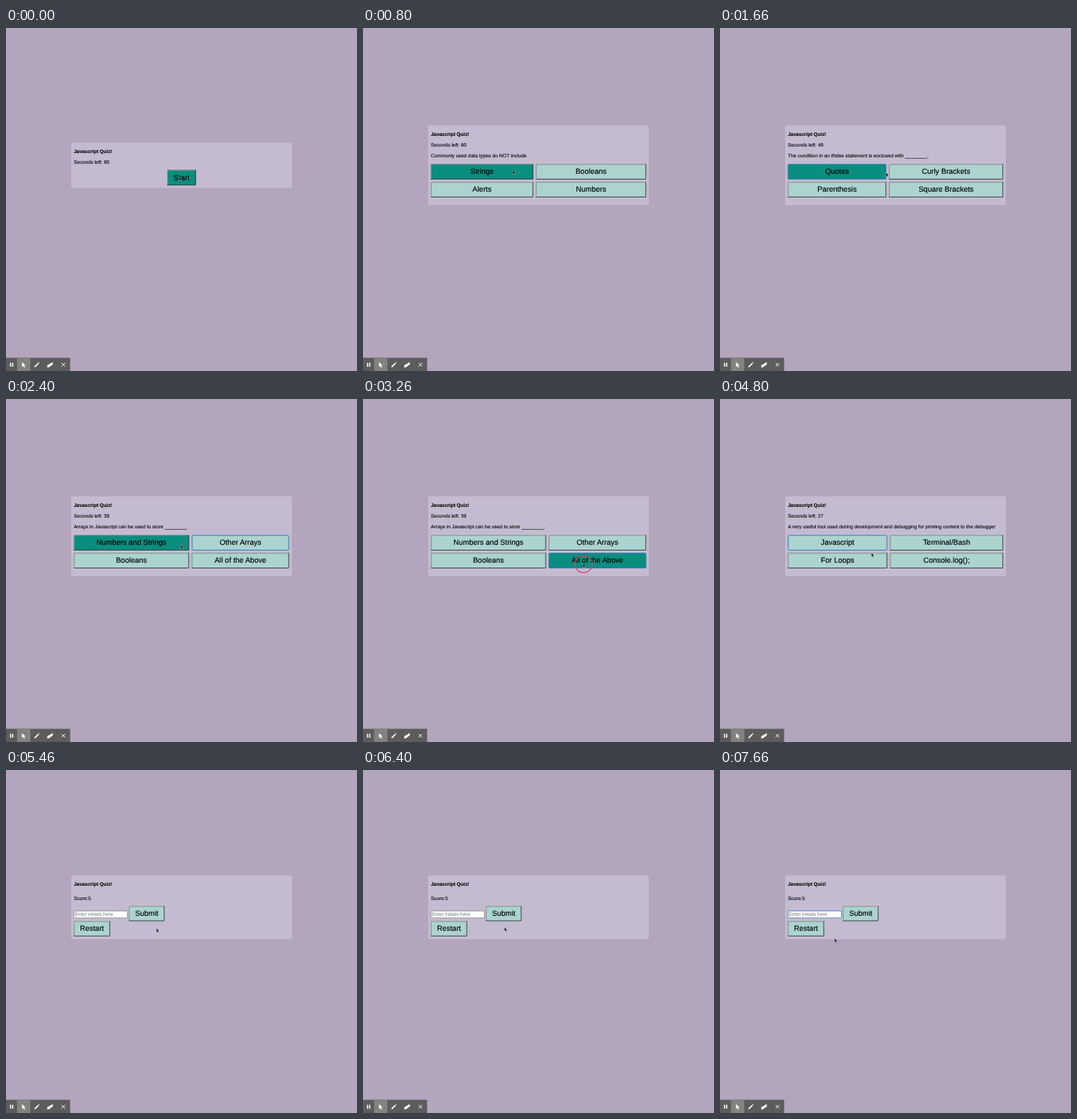
An HTML page that plays this animation: 490 px wide and 480 px high, repeating every 8 s.

```html
<!DOCTYPE html>
<html lang="en">
<head>
<meta charset="utf-8">
<title>Quiz</title>
<style>
  html, body { margin: 0; width: 100%; height: 100%; overflow: hidden; background: #b2a5bc; }
  svg { display: block; width: 490px; height: 480px; }
  text { font-family: "Liberation Sans", Arial, sans-serif; font-size: 6.93px; text-rendering: geometricPrecision; stroke: #000; stroke-width: .1px; }
  .title { font-weight: bold; }
  .label { font-size: 10.4px; text-anchor: middle; stroke-width: .15px; }
  .hint { fill: #757575; stroke: none; }
</style>
</head>
<body>
<svg viewBox="0 0 490 480" xmlns="http://www.w3.org/2000/svg">
  <rect width="490" height="480" fill="#b2a5bc"/>
  <g id="page"></g>
  <g id="toolbar">
    <rect y="461.5" width="89.5" height="18.5" fill="#5d5c5d"/>
    <rect x="15.5" y="461.5" width="18.5" height="18.5" fill="#83827f"/>
    <g fill="none" stroke="#fff">
      <path d="M6.4 468.5V474M9.4 468.5V474" stroke-width="1.6"/>
      <path d="M40 474.4L45 469.4M45.6 468.8L46.3 468.1" stroke-width="2"/>
      <path d="M77.7 468.7L82.7 473.7M82.7 468.7L77.7 473.7"/>
    </g>
    <path d="M57.6 472L65.4 467.5V470.8L60.4 474.4L57.6 475.2Z" fill="#fff"/>
    <path d="M22.4 467.6V474.2L24 472.8L25.2 475.4L26.4 474.9L25.2 472.4H27.4Z" fill="#fff"/>
  </g>
  <g id="pointer"></g>
</svg>
<script>
const LOOP = 8000, STEP = LOOP / 120;
const LEFT = 94.7, RIGHT = 395.3, GAP = 3.8;
const PRESS = 70;      // from mouse down to the next screen
const LINGER = 140;    // from mouse down until the pointer leaves
const PENALTY = 10;
const page = document.getElementById('page');
const pointer = document.getElementById('pointer');

// Where the pointer rests: it arrives, may click, then glides on.
const stops = [
  { x: 241.5, y: 208, arrive: 0, click: 200 },
  { x: 208.8, y: 199, arrive: 800, click: 1130 },
  { x: 244.3, y: 204, arrive: 1930, click: 2260 },
  { x: 307, y: 230, arrive: 3060, click: 3260 },
  { x: 213.5, y: 206, arrive: 4060, click: 4400 },
  { x: 210, y: 221.5, arrive: 5000, click: 5260, leave: 6130 },
  { x: 197.5, y: 220, arrive: 6400, leave: 6400 },
  { x: 140, y: 201, arrive: 6930, click: 7200 },
  { x: 160, y: 235.5, arrive: 7660, leave: LOOP }
];
const clicks = stops.filter(s => s.click);

// pick is the chosen answer; spent counts the seconds used up before it.
const questions = [
  { text: 'Commonly used data types do NOT include', pick: 0, spent: 0,
    answers: ['Strings', 'Booleans', 'Alerts', 'Numbers'] },
  { text: 'The condition in an if/else statement is enclosed with ________.', pick: 1, spent: 1,
    answers: ['Quotes', 'Curly Brackets', 'Parenthesis', 'Square Brackets'] },
  { text: 'Arrays in Javascript can be used to store ________.', pick: 3, spent: 0, right: true,
    answers: ['Numbers and Strings', 'Other Arrays', 'Booleans', 'All of the Above'] },
  { text: 'String values must be enclosed within ________ when being assigned.', pick: 0, spent: 2,
    answers: ['Commas', 'Curly Brackets', 'Quotes', 'Parenthesis'] },
  { text: 'A very useful tool used during development and debugging for printing content to the debugger',
    pick: 2, spent: 0, answers: ['Javascript', 'Terminal/Bash', 'For Loops', 'Console.log();'] }
];

// Both columns get their widest label plus an equal share of the spare width.
const pen = document.createElement('canvas').getContext('2d');
pen.font = '104px "Liberation Sans", Arial, sans-serif';
const widest = labels => Math.max(...labels.map(s => pen.measureText(s).width / 10));

let left = 60, last = -1;
questions.forEach((q, i) => {
  const [a, b, c, d] = q.answers;
  q.split = LEFT + (RIGHT - LEFT - GAP + widest([a, c]) - widest([b, d])) / 2;
  q.from = clicks[i].click + PRESS;
  q.until = clicks[i + 1].click;
  q.left = left;
  q.focus = last;
  left -= q.spent + (q.right ? 0 : PENALTY);
  last = q.pick;
});
const END = questions[questions.length - 1].until + PRESS;
const INPUT_CLICK = clicks[clicks.length - 1].click;

const ease = u => u * u * (3 - 2 * u);
const inside = (p, x, y, r, b) => p.x >= x && p.x < r && p.y >= y && p.y < b;

function tipAt(t) {
  const i = stops.findLastIndex(s => s.arrive <= t);
  const a = stops[i], b = stops[i + 1];
  const leave = a.leave ?? a.click + LINGER;
  if (!b || t <= leave) return a;
  const u = ease((t - leave) / (b.arrive - leave));
  return { x: a.x + (b.x - a.x) * u, y: a.y + (b.y - a.y) * u };
}

const text = (s, x, y, cls = '') => `<text class="${cls}" x="${x}" y="${y}">${s}</text>`;

const panel = (top, bottom) =>
  `<rect x="91" y="${top}" width="308" height="${bottom - top}" rx="2" fill="#c5bbd0"/>`;

function button(label, x, y, r, b, tip, focused) {
  const fill = inside(tip, x, y, r, b) ? '#0a8e7e' : '#abd3cf';
  const edge = focused
    ? `<rect x="${x + .5}" y="${y + .5}" width="${r - x - 1}" height="${b - y - 1}" rx="1.2" fill="none" stroke="#2f78c4"/>`
    : `<path d="M${x + .5} ${b}V${y + .5}H${r}" fill="none" stroke="#818b89"/>` +
      `<path d="M${x} ${b - .5}H${r - .5}V${y}" fill="none" stroke="#35413f"/>`;
  return `<rect x="${x}" y="${y}" width="${r - x}" height="${b - y}" rx="${focused ? 1.5 : 0}" fill="${fill}"/>` +
    edge + text(label, (x + r) / 2, y + 13.9, 'label');
}

const heading = (y, secs) =>
  text('Javascript Quiz!', LEFT, y, 'title') + text('Seconds left: ' + secs, LEFT, y + 15);

function startScreen(tip) {
  return panel(160.4, 223.7) + heading(175, 60) + button('Start', 225, 198.6, 265.2, 220.2, tip);
}

function questionScreen(q, t, tip) {
  const focused = t >= q.until ? q.pick : q.focus;
  const ticks = Math.round(q.spent * Math.min(1, (t - q.from) / 800));
  const cells = q.answers.map((label, i) => {
    const x = i % 2 ? q.split + GAP : LEFT;
    const y = i < 2 ? 190.4 : 215.4;
    return button(label, x, y, i % 2 ? RIGHT : q.split, y + 21.6, tip, i === focused);
  });
  return panel(136.3, 248) + heading(150.7, q.left - ticks) + text(q.text, LEFT, 180.8) + cells.join('');
}

function endScreen(t, tip) {
  const edge = t >= INPUT_CLICK ? '#3b7fd0' : '#8b8790';
  return panel(147.4, 236.7) + text('Javascript Quiz!', LEFT, 162, 'title') + text('Score:5', LEFT, 181.7) +
    `<rect x="95" y="197.2" width="74.6" height="9.8" rx=".6" fill="#fff" stroke="${edge}" stroke-width=".9"/>` +
    text('Enter initials here', 96.2, 204.4, 'hint') +
    button('Submit', 171.6, 190.4, 221.3, 211.5, tip) +
    button('Restart', 94.6, 211.5, 145.4, 232.8, tip);
}

function ring(t, tip) {
  const hit = clicks.find(s => t >= s.click && t < s.click + 190);
  if (!hit) return '';
  const u = (t - hit.click) / 190;
  return `<circle cx="${tip.x + 1}" cy="${tip.y + 1}" r="${12.4 * (1 - u)}" fill="none" stroke="#d6405c" stroke-width="1.5" opacity="${.9 - .8 * u}"/>`;
}

function cursor(t, tip) {
  if (t >= END && inside(tip, 95, 197, 170, 207)) {
    return `<path transform="translate(${tip.x} ${tip.y + 1})" d="M-1.2 -3H1.2M0 -3V3M-1.2 3H1.2" fill="none" stroke="#222" stroke-width=".7"/>`;
  }
  return `<path transform="translate(${tip.x} ${tip.y})" d="M0 0V5.6L1.3 4.5L2.2 6.5L3.2 6.1L2.3 4.2H4Z" fill="#111" stroke="#ddd" stroke-width=".4"/>`;
}

function draw(t) {
  const tip = tipAt(t);
  const q = questions.findLast(e => e.from <= t);
  page.innerHTML = t >= END ? endScreen(t, tip) : q ? questionScreen(q, t, tip) : startScreen(tip);
  pointer.innerHTML = ring(t, tip) + cursor(t, tip);
}

// The picture advances 15 times a second.
let shown = -1;
function tick() {
  const n = Math.floor((performance.now() % LOOP + 6.7) / STEP) % 120;
  if (n !== shown) draw((shown = n) * STEP);
  requestAnimationFrame(tick);
}
tick();
</script>
</body>
</html>
```
